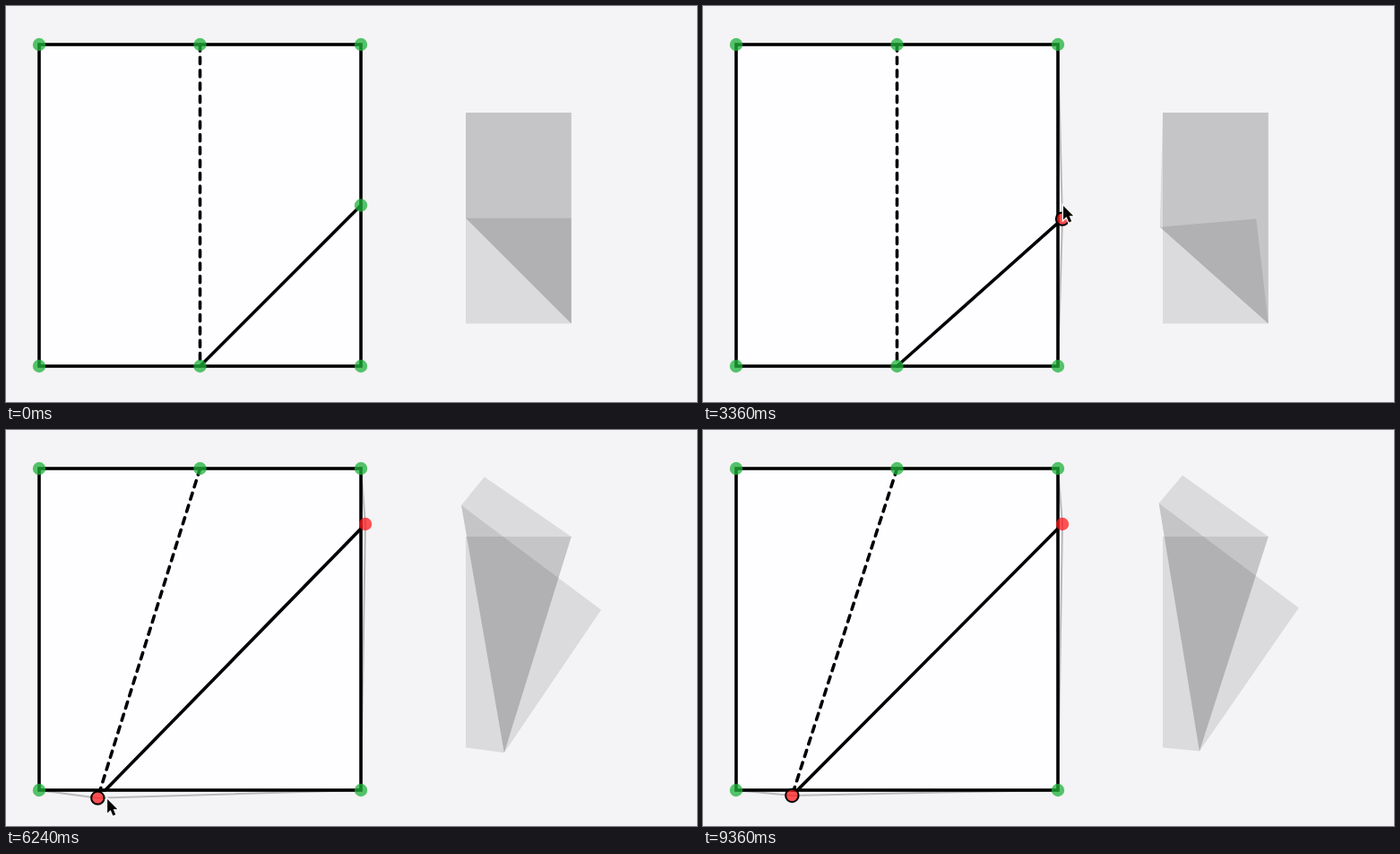
An HTML page that plays this animation: 771x442 px, repeating every 9.44 s.

```html
<!DOCTYPE html>
<html lang="en">
<head>
<meta charset="utf-8">
<title>Folding a square</title>
<style>
  html, body { margin: 0; width: 100%; height: 100%; overflow: hidden; background: #f4f3f5; }
  svg { display: block; width: 771px; height: 442px; }
</style>
</head>
<body>
<svg viewBox="0 0 771 442">
  <clipPath id="sheet"><rect x="35.2" y="41.2" width="362.6" height="362.6"/></clipPath>
  <polygon id="paper" fill="none" stroke="#bab9bc" stroke-width="2"/>
  <rect x="37" y="43" width="359" height="359" fill="#fefdff" stroke="#000" stroke-width="3.6"/>
  <g stroke="#000" stroke-width="3.6" stroke-linecap="round" clip-path="url(#sheet)">
    <line id="valley" stroke-dasharray="7.18"/>
    <line id="mountain"/>
  </g>
  <g id="faces" fill="#000" fill-opacity=".1"></g>
  <g id="dots" fill-opacity=".75" stroke-width="2"></g>
  <path id="cursor" d="M0 0V15.6L3.6 12.3L6.2 18.6L9.2 17.3L6.6 11.2H11.2Z"
        fill="#000" stroke="#fff" stroke-width="2.6" paint-order="stroke"/>
</svg>
<script>
const LOOP = 9440, STEP = 40;
const A = [37, 43], B = [216.5, 43], C = [396, 43], E = [396, 402], G = [37, 402];
const P0 = [396, 222.5], Q0 = [216.5, 402];
const GREEN = 'rgb(30,178,58)', RED = 'rgb(255,25,28)';

// When the pointer shows, and when each point is dragged
const SHOW = 240, HIDE = 8520;
const dragP = [1000, 4000], dragQ = [5160, 7960];

// Eased pointer moves: start, end, x, y
const entry = [405, 337];
const moves = [
  [240, 900, 397, 222],
  [960, 1630, 402, 110],
  [1630, 2740, 401, 298],
  [3063, 3753, 401, 105],
  [4100, 4840, 217, 403],
  [5160, 5906, 86, 411],
  [6060, 6960, 337, 406],
  [7040, 7760, 99.4, 408],
  [8080, 8480, 100, 412]
];

const NS = 'http://www.w3.org/2000/svg';
const $ = id => document.getElementById(id);
const set = (el, attrs) => { for (const k in attrs) el.setAttribute(k, attrs[k]); };
const add = (parent, tag) => parent.appendChild(document.createElementNS(NS, tag));

const faces = [0, 1, 2].map(() => add($('faces'), 'polygon'));
const dots = [A, B, C, E, G, P0, Q0].map(([cx, cy]) => {
  const dot = add($('dots'), 'circle');
  set(dot, { cx, cy, r: 7.2, fill: GREEN });
  return dot;
});

const ease = s => s * s * (3 - 2 * s);

function pointer(t) {
  let [x, y] = entry;
  for (const [from, to, nx, ny] of moves) {
    const k = ease(Math.min(Math.max((t - from) / (to - from), 0), 1));
    x += (nx - x) * k;
    y += (ny - y) * k;
  }
  return [x, y];
}

function reflect([x, y], [ax, ay], [bx, by]) {
  const dx = bx - ax, dy = by - ay;
  const k = 2 * ((x - ax) * dx + (y - ay) * dy) / (dx * dx + dy * dy);
  return [2 * ax + k * dx - x, 2 * ay + k * dy - y];
}

const dist = (a, b) => Math.hypot(a[0] - b[0], a[1] - b[1]);
const shrink = ([x, y]) => [513 + (x - 37) * 0.6563, 119 + (y - 43) * 0.6563];
const poly = pts => pts.map(p => p.map(n => n.toFixed(2)).join()).join(' ');
const join = (el, a, b) => set(el, { x1: a[0], y1: a[1], x2: b[0], y2: b[1] });

// A dragged point trails the pointer by one step
const dragged = (t, home, [from, to]) => t < from ? home : pointer(Math.min(t - STEP, to));

function drawDot(dot, at, home, active) {
  set(dot, {
    cx: at[0], cy: at[1],
    fill: dist(at, home) > 3 ? RED : GREEN,
    stroke: active ? '#000' : 'none'
  });
}

function draw(t) {
  const tip = pointer(t), shown = t >= SHOW && t < HIDE;
  const P = dragged(t, P0, dragP), Q = dragged(t, Q0, dragQ);

  set($('paper'), { points: poly([A, B, C, P, E, Q, G]) });
  join($('valley'), B, Q);
  join($('mountain'), Q, P);

  const C1 = reflect(C, B, Q), P1 = reflect(P, B, Q);
  const E1 = reflect(reflect(E, B, Q), Q, P1);
  [[A, B, Q, G], [B, C1, P1, Q], [Q, P1, E1]].forEach((f, i) =>
    set(faces[i], { points: poly(f.map(shrink)) }));

  const near = p => shown && dist(tip, p) < 9;
  drawDot(dots[5], P, P0, near(P) || (t >= dragP[0] && t < dragP[1]));
  drawDot(dots[6], Q, Q0, near(Q) || t >= dragQ[0]);
  set($('cursor'), {
    transform: `translate(${tip[0] + 1} ${tip[1] + 1.5})`,
    visibility: shown ? 'visible' : 'hidden'
  });
}

const start = performance.now();
function tick() {
  const t = (performance.now() - start) % LOOP;
  draw(Math.floor(t / STEP) * STEP);
  requestAnimationFrame(tick);
}
tick();
</script>
</body>
</html>
```
